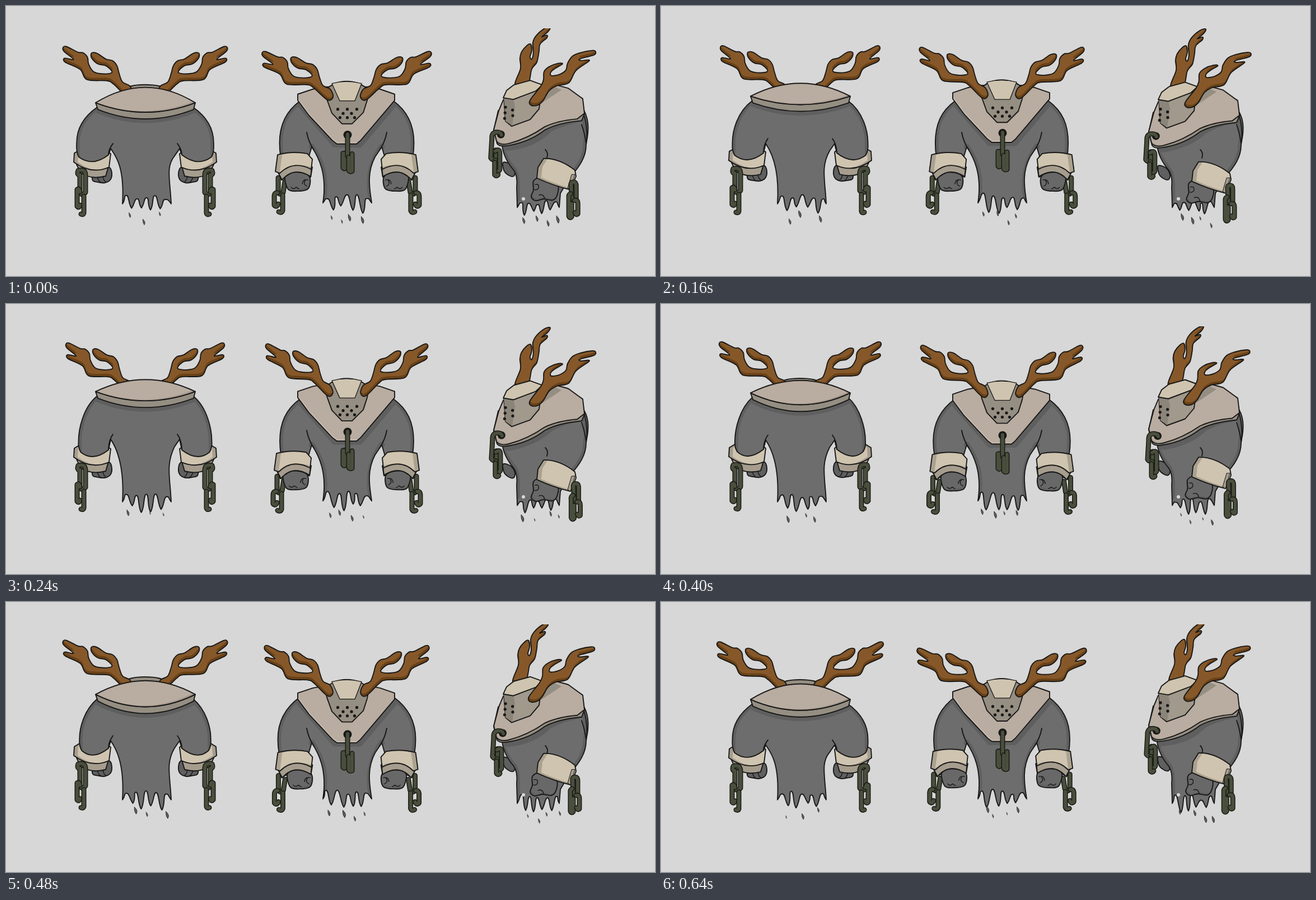
Write an HTML page with a canvas that moves like this. It is 1159x483 px and loops after 720 ms.

```html
<!DOCTYPE html>
<html>
<head>
<meta charset="utf-8">
<style>
html, body { margin: 0; width: 100%; height: 100%; overflow: hidden; background: #d7d7d7; }
canvas { display: block; width: 1159px; height: 483px; }
</style>
</head>
<body>
<canvas id="stage" width="1159" height="483"></canvas>
<script>
const c = document.getElementById('stage').getContext('2d');
const BG = '#d7d7d7', INK = '#181818', GREY = '#6d6d6d', DARK = '#5f5f5f',
  CLOTH = '#b9aca0', RIM = '#958e82', BONE = '#cfc4af', BONE2 = '#a69d8e';
const STEP = 80, STEPS = 9;
let step = 0;

// Breathing: every part swings once per loop, furthest at its own peak step.
const wave = (mid, amp, peak) => mid + amp * Math.cos(2 * Math.PI * (step - peak) / STEPS);

function rng(seed) {
  return (lo, hi) => {
    seed = seed * 16807 % 2147483647;
    return lo + (hi - lo) * seed / 2147483647;
  };
}

function shape(d, fill, w = 1.9) {
  const p = new Path2D(d);
  if (fill) { c.fillStyle = fill; c.fill(p); }
  if (w) { c.lineWidth = w; c.strokeStyle = INK; c.stroke(p); }
}

// A shape whose lit side is the same outline, moved by (x, y).
function lit(d, fill, shade, x, y) {
  const p = new Path2D(d);
  c.save();
  c.clip(p);
  c.fillStyle = shade;
  c.fill(p);
  c.translate(x, y);
  c.fillStyle = fill;
  c.fill(p);
  c.restore();
  shape(d);
}

// Body fill with bands of shade along the given lines.
function body(d, shade) {
  const p = new Path2D(d);
  c.fillStyle = GREY;
  c.fill(p);
  c.save();
  c.clip(p);
  c.lineWidth = 11;
  c.strokeStyle = DARK;
  c.stroke(new Path2D(shade));
  c.restore();
  shape(d);
}

function move(x, y, draw) {
  c.save();
  c.translate(x, y);
  draw();
  c.restore();
}

function mirror(sum, draw) {
  draw();
  c.save();
  c.translate(sum, 0);
  c.scale(-1, 1);
  draw();
  c.restore();
}

// Smooth closed curve through points.
function blob(text) {
  const p = text.split(' ').map(s => s.split(',').map(Number));
  const q = i => p[(i + p.length) % p.length];
  let d = 'M' + p[0];
  p.forEach((a, i) => {
    const z = q(i - 1), b = q(i + 1), e = q(i + 2);
    d += `C${a[0] + (b[0] - z[0]) / 6},${a[1] + (b[1] - z[1]) / 6} ` +
      `${b[0] - (e[0] - a[0]) / 6},${b[1] - (e[1] - a[1]) / 6} ${b}`;
  });
  return d + 'Z';
}

function chain(...links) {
  for (const d of links) {
    const p = new Path2D(d);
    for (const [w, color] of [[9, '#1b1d17'], [5.8, '#4a4f3d']]) {
      c.lineWidth = w;
      c.strokeStyle = color;
      c.stroke(p);
    }
  }
}

function dot(x, y, r, fill) {
  c.beginPath();
  c.arc(x, y, r, 0, 7);
  c.fillStyle = fill;
  c.fill();
}

// Ragged hem from left to right: pointed tongues with rounded gaps, new each step.
function hem(left, right, gap, reach, teeth, rnd) {
  const w = (right - left) / (teeth - 1);
  let x = left, y = gap + reach * 0.4, d = `${x} ${y}`;
  for (let i = 1; i < teeth; i++) {
    const edge = i == teeth - 1;
    const nx = edge ? right : left + w * i + rnd(-3, 3);
    const ny = gap + reach * (edge ? 0.4 : rnd(0.55, 1));
    const gx = (x + nx) / 2 + rnd(-2, 2), gy = gap + rnd(-5, 6);
    d += `C${x + w * 0.35} ${y - 8} ${gx - w * 0.3} ${gy} ${gx} ${gy}` +
      `C${gx + w * 0.3} ${gy} ${nx - w * 0.35} ${ny - 8} ${nx} ${ny}`;
    x = nx;
    y = ny;
  }
  return d;
}

// Scraps torn off below the hem.
function scraps(left, right, y, count, rnd) {
  for (let i = 0; i < count; i++) {
    move(left + (right - left) * (i + rnd(0.2, 0.8)) / count, y + rnd(-8, 10), () => {
      const s = rnd(0.4, 1.1);
      c.scale(s, s);
      shape('M-2 -6Q5 0 1 6Q-3 1 -2 -6Z', DARK, 0.8);
    });
  }
}

const ANTLER = blob('101,75 107,73 128,83 137,84 145,92 147,104 155,117 166,121 184,121 189,117 178,107 164,104 153,94 152,85 162,85 178,95 190,98 198,107 202,121 208,136 221,143 226,157 216,162 192,140 180,134 144,132 132,114 105,101 104,94 120,96 103,82');
const NEAR = blob('1053,82 1047,80 1026,84 1012,90 1003,103 1000,115 988,123 974,125 973,119 981,112 994,104 986,103 970,109 961,118 960,132 955,144 936,169 938,178 949,178 959,170 970,152 984,143 1005,138 1018,116 1042,98 1027,98 1025,95 1050,88');
const FAR = blob('972,38 962,40 947,53 941,66 942,84 939,95 936,91 939,80 937,68 930,71 921,82 918,94 919,112 909,142 932,140 939,113 948,101 952,82 954,68 966,57 966,52 957,55 968,46');
const FIST = blob('500,306 510,298 530,298 543,304 545,317 540,328 522,331 506,328');
const SIDE_FIST = blob('942,312 955,305 975,307 986,320 984,338 976,346 960,344 946,347 938,340 942,328');

const antler = d => lit(d, '#865829', '#694117', 1, -5);

// Leans the antler so that its tip lands on (x, y) and its base moves by dy.
function leanAntler(x, y, dy) {
  const k = (219 - x) / 118, b = (75 + dy - y) / 118;
  c.save();
  c.transform(k, b, 0, 1, 219 * (1 - k), dy - 219 * b);
  antler(ANTLER);
  c.restore();
}

function drawBack() {
  const rnd = rng(step * 7919 + 40127);
  const y = wave(165, -9.5, 3.7), top = wave(140.5, -6, 3.7), low = wave(183.5, -10.5, 3.2),
    rim = low + 12, hat = wave(137, -4, 5), pit = wave(248.5, -7.5, 3.8),
    arm = wave(129, 3, 5), cuff = wave(-3, -3.3, 4.3), hand = 270 + cuff, r = 497 - arm;

  mirror(497, () => move(0, cuff, () => {
    shape(blob('155,300 165,290 184,288 189,299 186,311 176,316 165,315 155,312'), DARK);
    shape('M163 306q3 8 6 9M173 304q1 8 5 10', null, 1.4);
    shape('M126 283L133 298Q152 311 178 304L183 287Z', BONE2);
    lit('M122 263L121 279Q152 302 184 288L187 264Q155 240 122 263Z', BONE, BONE2, 7, 0);
  }));
  const side = `C${arm + 8} ${y + 28} ${arm} 225 ${arm} 245`;
  const other = `C${r} 225 ${r - 8} ${y + 28} 334 ${y + 8}`;
  body(`M163 ${y + 8}${side}Q${arm - 1} ${hand - 8} ${arm + 4} ${hand}Q155 ${hand + 18} 183 ${hand - 4}
    L187 ${pit}C196 ${pit + 13} 212 288 ${hem(208, 295, 341, 32, 6, rnd)}
    C293 310 285 288 301 ${pit + 13}L310 ${pit}L314 ${hand - 4}Q342 ${hand + 18} ${r - 4} ${hand}
    Q${r + 1} ${hand - 8} ${r} 245${other}Z`,
    `M163 ${y + 8}${side}V${hand}M${r} ${hand}V245${other}M160 ${y + 12}Q249 ${2 * rim - y - 8} 338 ${y + 12}`);
  mirror(497, () => shape(`M191 ${pit - 9}Q184 ${pit} 183 ${hand - 6}`));
  scraps(210, 295, 379, 3, rnd);

  shape(`M210 ${hat + 10}Q218 ${hat} 248 ${hat}Q280 ${hat} 287 ${hat + 10}V165H210Z`, RIM);
  mirror(497, () => leanAntler(wave(103.5, 3.5, 3), wave(72.3, -2.3, 5), wave(-2.6, -2.6, 4.3)));
  shape(`M160 ${y}Q249 ${2 * low - y} 338 ${y}L335 ${y + 12}Q249 ${2 * rim - y - 12} 164 ${y + 12}Z`, RIM);
  lit(`M160 ${y}Q249 ${2 * top - y} 338 ${y}Q249 ${2 * low - y} 160 ${y}Z`, CLOTH, '#a3978b', -4, -2);
  mirror(497, () => move(0, cuff, () => chain(
    'M129 294Q142 290 142 303V333Q137 340 132 334V302Q126 302 129 294',
    'M127 328Q131 325 132 332M127 328V358Q130 362 132 356', 'M139 340V370Q138 374 134 372')));
}

function drawFront() {
  const rnd = rng(step * 7919 + 90533);
  const arm = wave(487.7, 2.2, 1.7), r = 1217 - arm, collar = wave(0, -4, 1.8),
    head = wave(1.5, -3.3, 1.9), cx = wave(-1.5, -1.5, 2.8), cy = wave(1.6, 1.9, 5.5),
    hx = wave(-1.7, -4.2, 2.2);

  const side = `C500 188 ${arm} 212 ${arm} 245Q${arm} 258 ${arm + 2} 270`;
  const other = `L${r - 2} 270Q${r} 258 ${r} 245C${r} 212 717 188 692 170`;
  body(`M525 170${side}L540 272L546 252C558 270 574 300 ${hem(566, 653, 339, 33, 6, rnd)}
    C650 330 643 300 659 270L671 252L677 272${other}Z`,
    `M525 170${side}M${r - 2} 270${other}M546 252C558 270 574 300 566 345M671 252C659 270 643 300 653 345
     M520 ${172 + collar}L587 ${249 + collar}H632L697 ${172 + collar}`);
  scraps(568, 650, 379, 4, rnd);

  mirror(1217, () => {
    shape('M537 226Q540 243 550 258');
    move(cx, cy, () => {
      chain('M487 307V334Q493 340 496 333L499 314',
        'M486 334Q480 333 480 341V356Q484 361 487 354', 'M495 338V366Q493 371 488 368');
      shape('M483 288L493 311Q515 295 545 306L548 288Z', BONE2);
    });
    move(hx, cy, () => {
      lit(FIST, '#686868', DARK, -2, -4);
      shape('M531 318q1 -9 10 -7M536 312q-4 7 3 10M511 324q4 5 9 0l5 3', null, 1.4);
    });
    move(cx, cy, () => {
      shape('M486 296Q512 274 547 288L545 305Q515 286 494 311Z', BONE2);
      lit('M486 266Q512 259 539 264L548 274L546 292Q514 275 490 299L482 296Z', BONE, '#aaa18f', 8, 0);
    });
  });

  move(0, collar, () => lit('M521 159L548 150L570 146H647L668 150L694 159V170L633 242L626 248H591L583 242L541 197L521 170Z',
    CLOTH, '#cbbfb2', 1, -3));
  move(0, head, () => {
    shape('M570 150Q586 134 608 134Q632 134 648 150L645 168L638 190L618 210H600L582 191L573 166Z', RIM);
    shape('M582 138Q608 131 635 138L623 169H596Z', BONE, 1.3);
    for (let row = 0; row < 3; row++) {
      const n = 3 - row % 2;
      for (let i = 0; i < n; i++) dot(609.5 + (i - (n - 1) / 2) * (17 - 2 * row), 184 + 7.5 * row, 2.6, INK);
    }
  });
  mirror(1217, () => move(358, 6, () =>
    leanAntler(wave(103, 3.7, 4), wave(73, -6, 3.5), wave(-1.3, -2.4, 3))));
  move(0, collar * 1.2, () => {
    dot(610, 232, 7.5, INK);
    chain('M602 265V291Q605 295 607 288V264', 'M610 231V270', 'M612 272V295Q613 299 618 297V266');
  });
}

function drawSide() {
  const rnd = rng(step * 7919 + 15013);
  const bob = wave(1.7, 2.6, 3.2), sway = wave(-1.5, -2.5, 6), cuff = wave(3.3, 5, 2.7), hand = cuff * 0.75;

  c.save();
  c.beginPath();
  c.rect(800, 40, 300, 400);
  c.clip();
  move(sway, bob, () => antler(FAR));
  c.restore();

  move(0, cuff, () => shape(blob('888,278 902,282 909,294 906,303 896,300 889,292'), DARK));
  shape(`M1028 ${180 + bob}Q1046 205 1036 246L1024 240Z`, GREY);
  const rear = 'C1024 288 1036 270 1036 248C1039 230 1037 205 1030 190';
  body(`M886 250Q889 273 907 294Q914 304 912 325L${hem(913, 988, 349, 28, 6, rnd)}L990 335L1008 305${rear}L880 230Z`,
    `M1008 305${rear}M886 252L898 ${253 + bob}Q945 248 970 ${220 + bob}Q1000 206 1034 ${200 + bob}
     M886 255Q889 273 907 294Q914 304 912 345`);
  shape('M963 257Q969 262 966 272M1028 212Q1034 230 1036 246');
  dot(924, 345, 3, BG);
  scraps(918, 998, 383, 4, rnd);
  move(sway / 2, hand, () => {
    lit(SIDE_FIST, '#686868', DARK, 2, -3);
    shape('M945 318q8 -2 6 7q-4 4 -7 2M952 337q8 -3 10 6', null, 1.4);
  });
  move(0, cuff, () => {
    lit('M960 271Q988 270 1016 292L1018 303L1008 327Q978 320 948 306L950 287Z', BONE, '#aaa18f', 8, -1);
    shape('M1016 300L1008 327L1003 324L1010 300Z', BONE2, 1);
  });
  move(wave(1.5, 2.5, 4), cuff, () => chain('M1011 314Q1019 311 1019 320V343Q1014 348 1011 341L1010 316',
    'M1009 334Q1005 336 1006 342V374Q1008 379 1011 375V352', 'M1016 346Q1022 344 1022 352V370Q1019 373 1017 368'));

  move(0, bob, () => {
    shape('M879 187L871 222L877 246Q882 253 900 249Q935 243 962 222Q985 209 1028 205L1033 193L1029 165L1000 150Z', RIM);
    lit('M888 168L880 187L871 221L876 242Q883 250 898 246Q932 237 962 216Q985 205 1020 202L1033 192L1030 166L1004 147L968 137L930 150Z',
      CLOTH, '#a99d91', 2, -2);
    shape('M935 196L950 178L992 150L968 139L942 150Z', RIM, 0);
    shape('M889 163L892 206L903 215L936 203L952 184L956 152L948 150L906 167Z', '#a0998c');
    shape('M889 163L906 167L909 180L904 214L892 206Z', '#8b8479', 0);
    shape('M888 164L894 151L907 141L936 133L958 141L946 152L906 167Z', BONE);
    for (let i = 0; i < 5; i++) dot(892 + i % 2 * 13 - i * i % 3 * i * 0.4, 181 + i * 5, 2.6, INK);
  });
  move(sway / 2, bob - 0.5, () => antler(NEAR));
  move(wave(1.2, 1.9, 5.5), wave(3, 3.3, 4.4), () => {
    dot(884, 230, 7, INK);
    chain('M885 231Q884 226 877 226Q867 226 868 238L866 272Q870 278 875 272V258',
      'M874 260Q882 254 882 264V293Q878 300 874 293V276', 'M873 280V302Q876 306 879 302');
  });
}

function draw(ms) {
  step = Math.floor(ms / STEP) % STEPS;
  c.fillStyle = BG;
  c.fillRect(0, 0, 1159, 483);
  c.lineJoin = c.lineCap = 'round';
  drawBack();
  drawFront();
  drawSide();
}

function tick() {
  draw(performance.now());
  requestAnimationFrame(tick);
}
tick();
</script>
</body>
</html>
```
